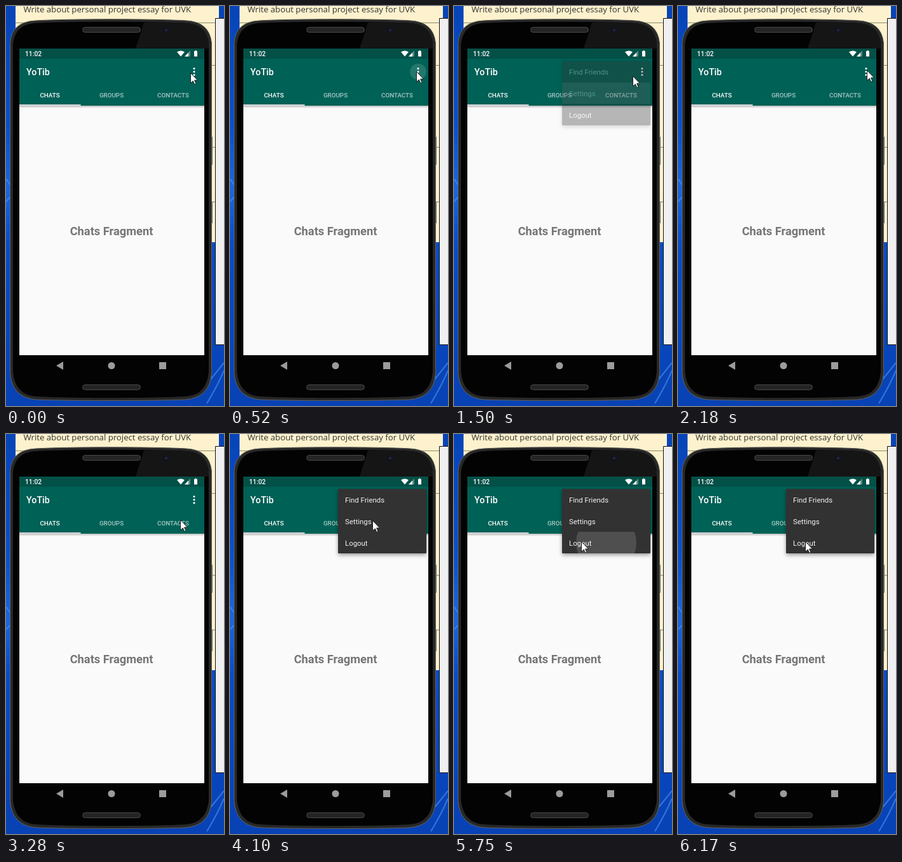
An HTML page for the animation above (8 s loop, 343 by 630 pixels).

```html
<!DOCTYPE html>
<html lang="en">
<head>
<meta charset="utf-8">
<title>Phone menu demo</title>
<style>
  html, body { margin: 0; width: 100%; height: 100%; overflow: hidden; }
  svg { display: block; }
  text { font-family: Roboto, sans-serif; fill: #fff; }
  .note { font: 13.2px "Open Sans", sans-serif; fill: #333; }
  .title { font-size: 14.3px; font-weight: 500; }
  .clock { font-size: 10.3px; font-weight: 500; }
  .tabs text { font-size: 9.8px; font-weight: 500; text-anchor: middle; }
  .idle { opacity: .66; }
  .page { font-size: 18.3px; font-weight: 700; fill: #757575; text-anchor: middle; }
  #menu text { font-size: 11.4px; fill: #f2f2f2; }
</style>
</head>
<body>
<svg width="343" height="630" viewBox="0 0 343 630">
  <defs>
    <linearGradient id="sky" x2="0" y2="1">
      <stop offset="0" stop-color="#0744b8"/>
      <stop offset=".3" stop-color="#0a50cc"/>
      <stop offset=".46" stop-color="#1a68de"/>
      <stop offset=".6" stop-color="#0a4cc8"/>
      <stop offset="1" stop-color="#0842b4"/>
    </linearGradient>
    <linearGradient id="shade" x2="0" y2="1">
      <stop offset="0" stop-opacity=".25"/>
      <stop offset="1" stop-opacity="0"/>
    </linearGradient>
    <filter id="drop" x="-10%" y="-10%" width="120%" height="130%">
      <feDropShadow dx="0" dy="2.500" stdDeviation="3" flood-opacity=".4"/>
    </filter>
    <clipPath id="lastRow"><path d="M170 154H309V188H170Z"/></clipPath>
  </defs>

  <!-- desktop -->
  <rect width="343" height="630" fill="url(#sky)"/>
  <path d="M0 272L8 284M0 308L8 299M316 626Q334 596 343 574M322 588L343 562"
        fill="none" stroke="#4f9cf4" stroke-width="2" opacity=".6"/>
  <rect x="15" width="320" height="372" fill="#fdf2cd"/>
  <path d="M15 26.5H335M322 93.5H330M322 222.5H330M322 308.5H330" stroke="#8f8871"/>
  <text class="note" x="27.500" y="9.500">Write about personal project essay for UVK</text>
  <path d="M329.5 19.5H344V533.5H329.5Z" fill="#f0f0f0" stroke="#111"/>

  <!-- phone -->
  <path d="M321 206H325V250H321ZM321 308H325V342H321Z" fill="#66676c"/>
  <path d="M46 23C100 20 230 20 284 23Q320 25 323.500 58V578Q321 617 282 620C230 622 100 622 48 620Q9 617 6.500 578V58Q9 25 46 23Z"
        fill="#282828" stroke="#65625a"/>
  <path d="M46 27C100 24 230 24 284 27Q316 29 319 60V576Q316 613 282 615C230 618 100 618 48 615Q14 613 11 576V60Q14 29 46 27Z" fill="#030303"/>
  <path d="M217 26Q260 25 284 27Q316 29 319 60V67H204Z" fill="#151515"/>
  <g fill="#242424" stroke="#484848">
    <rect x="120.500" y="33.500" width="91" height="8" rx="4"/>
    <rect x="120.500" y="596.500" width="91" height="8" rx="4"/>
  </g>
  <circle cx="252" cy="38" r="4.500" fill="#11131f"/>
  <circle cx="252" cy="38" r="2" fill="#252a48"/>

  <!-- screen -->
  <rect x="21" y="67" width="291" height="483" fill="#fafafa"/>
  <rect x="21" y="157" width="291" height="4" fill="url(#shade)"/>
  <rect x="21" y="67" width="291" height="90" fill="#006156"/>
  <rect x="21" y="67" width="291" height="16" fill="#035047"/>
  <rect x="21" y="155" width="96.500" height="2" fill="#d8d8de"/>
  <text class="clock" x="30" y="79">11:02</text>
  <g fill="#fff">
    <path d="M269 72.500Q275 68.500 281 72.500L275 79.500Z"/>
    <path d="M290 70V79.500H281Z" opacity=".35"/>
    <path d="M287 73.500V79.500H281Z"/>
    <path d="M296 71H297.500V70H299.500V71H301V79.500H296Z"/>
  </g>
  <text class="title" x="32" y="109">YoTib</text>
  <circle id="dotsRipple" cx="296" cy="103.500" fill="#fff"/>
  <path d="M296 98.5V98.51M296 103.5V103.51M296 108.5V108.51" stroke="#fff" stroke-width="3.200" stroke-linecap="round"/>
  <g class="tabs">
    <text x="69" y="144">CHATS</text>
    <text class="idle" x="166" y="144">GROUPS</text>
    <text class="idle" x="263" y="144">CONTACTS</text>
  </g>
  <text class="page" x="166" y="360.500">Chats Fragment</text>
  <g fill="#9c9c9c">
    <path d="M79 566.500L90 560V573Z"/>
    <circle cx="166" cy="566.500" r="5.500"/>
    <rect x="241" y="561" width="11" height="11"/>
  </g>

  <g id="menu">
    <rect x="170" y="86.500" width="139" height="101.500" rx="1.500" fill="#303030" filter="url(#drop)"/>
    <rect id="focus" x="170" y="120.500" width="139" height="33.500" fill="#5a5a5a"/>
    <g clip-path="url(#lastRow)"><circle id="rowRipple" cx="239.500" cy="171" fill="#fff"/></g>
    <text x="181" y="108">Find Friends</text>
    <text x="181" y="142">Settings</text>
    <text x="181" y="176">Logout</text>
  </g>

  <path id="cursor" d="M.5 .5V16.500L4.300 13L6.800 18.500L9 17.500L6.600 12H11.500Z" fill="#fff" stroke="#111" stroke-width=".9"/>
</svg>
<script>
const LOOP = 8000, FIRST = 250, STEP = 137.5;
const el = id => document.getElementById(id);

const beat = t => FIRST + Math.floor((t - FIRST) / STEP) * STEP;
const ramp = (t, from, to) => Math.min(1, Math.max(0, (t - from) / (to - from)));

// Straight pointer moves: when each begins and ends, and where it leads.
const moves = [
  { from: 112, to: 250, x: 293, y: 103 },
  { from: 1212, to: 1625, x: 275, y: 113 },
  { from: 1762, to: 2175, x: 297, y: 101 },
  { from: 3000, to: 3275, x: 274, y: 135 },
  { from: 3275, to: 3550, x: 245, y: 155 },
  { from: 3550, to: 3825, x: 235, y: 160 },
  { from: 3825, to: 4100, x: 224, y: 136 },
  { from: 4100, to: 4375, x: 218, y: 109 },
  { from: 4375, to: 4650, x: 207, y: 100 },
  { from: 4650, to: 4925, x: 200, y: 144 },
  { from: 4925, to: 5200, x: 200, y: 169 }
];

function pointerAt(t) {
  let x = 290, y = 105;
  for (const move of moves) {
    const p = ramp(t, move.from, move.to);
    x += (move.x - x) * p;
    y += (move.y - y) * p;
  }
  return [Math.round(x), Math.round(y)];
}

// A touch ripple spreads over two beats and fades over two after release.
function ripple(id, t, press, release, small, large) {
  const spread = ramp(t, press, press + 2 * STEP);
  const fade = 1 - ramp(t, release, release + 2 * STEP);
  el(id).setAttribute("r", small + (large - small) * spread);
  el(id).setAttribute("opacity", spread > 0 ? .14 * fade : 0);
}

function draw(time) {
  const t = beat(time);
  const firstVisit = t < 2000;
  const alpha = firstVisit
    ? ramp(t, 1075, 1212) - ramp(t, 1212, 1625)
    : ramp(t, 3275, 3550);
  el("menu").setAttribute("opacity", alpha);
  el("focus").setAttribute("opacity", firstVisit ? 1 : 0);
  ripple("dotsRipple", t, firstVisit ? FIRST : 2600, firstVisit ? 1000 : 3000, 11, 14.5);
  ripple("rowRipple", t, 5612.5, 5887.5, 23, 72);
  el("cursor").setAttribute("transform", `translate(${pointerAt(t)})`);
}

const start = performance.now();
function tick() {
  draw((performance.now() - start) % LOOP);
  requestAnimationFrame(tick);
}
tick();
</script>
</body>
</html>
```
